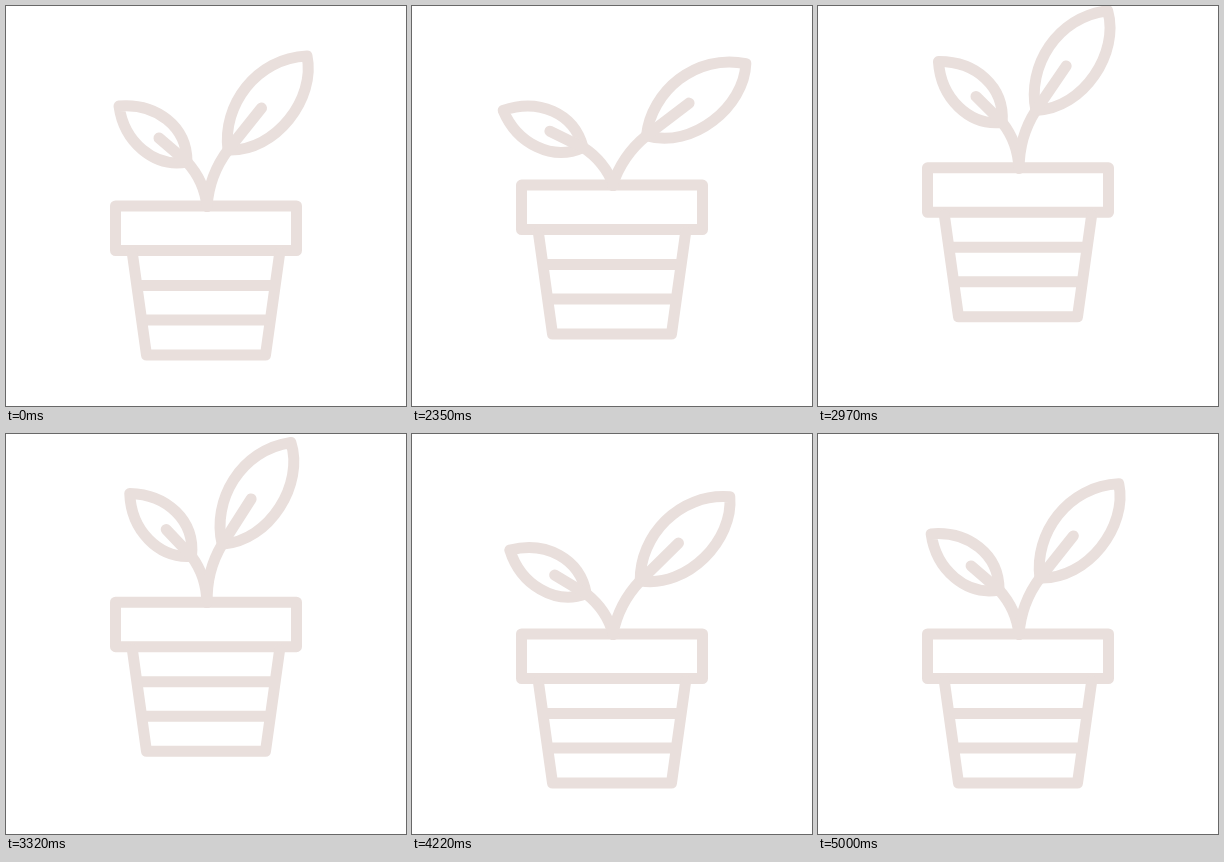
Recreate the animation shown at these times as an HTML page. Size 400x400 px, loop 5020 ms.

```html
<!DOCTYPE html>
<html lang="en">
<head>
<meta charset="utf-8">
<title>Potted plant</title>
<style>
  html, body { margin: 0; width: 100%; height: 100%; overflow: hidden; background: #fff; }
  svg { display: block; width: 100vw; height: 100vh; }
  #plant { fill: none; stroke: #e9dfdc; stroke-width: 11; stroke-linecap: round; stroke-linejoin: round; }
</style>
</head>
<body>
<svg viewBox="0 0 400 400">
  <g id="plant">
    <path d="M109.5 200H290.5V244.5H109.5Z"/>
    <path d="M126.3 247L140.5 349H259.5L273.7 247M131 279.5H269M136 314H264"/>
    <g id="left">
      <path d="M113 100C150 97 181 120 181 156C148 162 118 136 113 100Z"/>
      <path d="M153 132L181 156C191 167 199 181 201 200.5"/>
    </g>
    <g id="right">
      <path d="M222 144C216 100 250 52 301 50C310 92 270 146 222 144Z"/>
      <path d="M255.5 102L222 144C208.5 162 202.5 179 201 200.5"/>
    </g>
  </g>
</svg>
<script>
const LOOP = 5020, START = 2020, STEP = 30;
const JUMP = 38.2, LEAN_IN = 6.1;

const get = id => document.getElementById(id);
const plant = get("plant"), left = get("left"), right = get("right");

// Eased progress from 0 to 1 between two times
function ease(t, from, to) {
  const u = Math.min(1, Math.max(0, (t - from) / (to - from)));
  return u * u * (3 - 2 * u);
}

// Height of the hop: up, a short hang, down
const hop = t => JUMP * (ease(t, START, 2640) - ease(t, 3133, 3818));

// Leaf angle: spread at take-off, lean in at the top, spread on landing, settle
function sway(t, takeOff, landing) {
  return takeOff * ease(t, START, 2353)
    - (takeOff + LEAN_IN) * ease(t, 2353, 3086)
    + (LEAN_IN + landing) * ease(t, 3285, 4005)
    - (landing + LEAN_IN) * ease(t, 4005, 4583)
    + LEAN_IN * ease(t, 4583, LOOP);
}

function turn(leaf, angle) {
  leaf.setAttribute("transform", `rotate(${angle} 201 198)`);
}

function draw(time) {
  let t = time % LOOP;
  if (t >= START) t -= (t - START) % STEP;
  plant.setAttribute("transform", `translate(0 ${-hop(t)})`);
  turn(left, -sway(t, 14.6, 16));
  turn(right, sway(t, 14, 12));
}

const begin = performance.now();
function tick() {
  draw(performance.now() - begin);
  requestAnimationFrame(tick);
}
tick();
</script>
</body>
</html>
```
